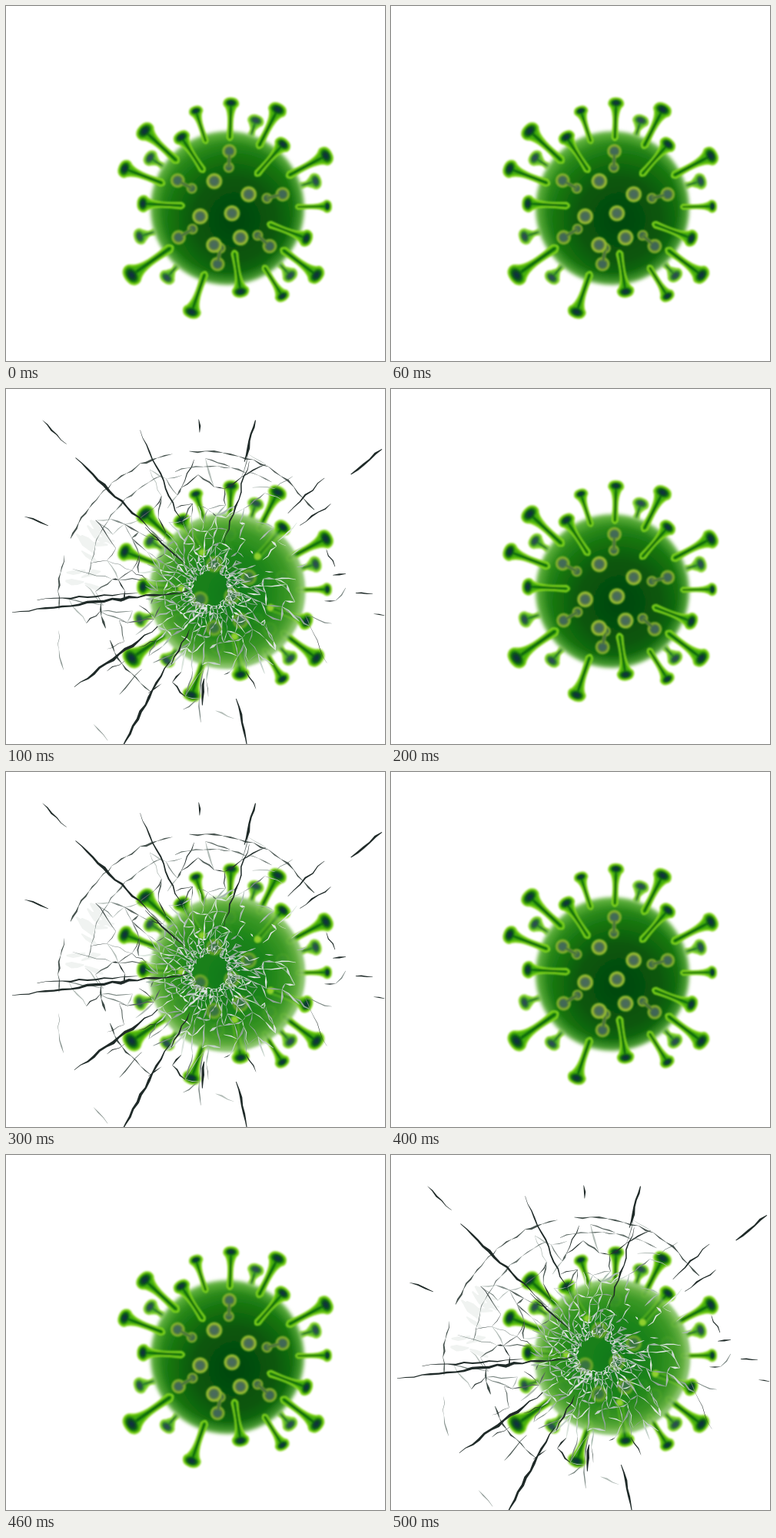
An HTML page for the animation above (600 ms loop, 493x462 px).

```html
<!DOCTYPE html>
<html lang="en">
<head>
<meta charset="utf-8">
<title>Virus behind breaking glass</title>
<style>
html, body { margin: 0; width: 100%; height: 100%; overflow: hidden; background: #fff; }
svg { display: block; width: 493px; height: 462px; }
</style>
</head>
<body>
<svg viewBox="0 0 493 462" xmlns="http://www.w3.org/2000/svg">
  <defs>
    <radialGradient id="skin" gradientUnits="userSpaceOnUse" cx="297" cy="278" r="119">
      <stop offset="0" stop-color="#04460a"/>
      <stop offset=".45" stop-color="#08570b"/>
      <stop offset=".72" stop-color="#187711"/>
      <stop offset="1" stop-color="#48a428"/>
    </radialGradient>
    <radialGradient id="edge">
      <stop offset=".84" stop-color="#7cc452" stop-opacity="0"/>
      <stop offset=".95" stop-color="#7cc452" stop-opacity=".45"/>
      <stop offset="1" stop-color="#b4de98" stop-opacity=".9"/>
    </radialGradient>
    <radialGradient id="lit">
      <stop offset="0" stop-color="#147f1a"/>
      <stop offset=".55" stop-color="#208a1a"/>
      <stop offset=".8" stop-color="#3f9c28"/>
      <stop offset=".93" stop-color="#6bb445"/>
      <stop offset="1" stop-color="#a9d68c"/>
    </radialGradient>
    <radialGradient id="head">
      <stop offset="0" stop-color="#12304a"/>
      <stop offset=".35" stop-color="#0c3a2c"/>
      <stop offset=".65" stop-color="#0e6412"/>
      <stop offset="1" stop-color="#2f9a10" stop-opacity="0"/>
    </radialGradient>
    <radialGradient id="dot">
      <stop offset="0" stop-color="#486764"/>
      <stop offset=".5" stop-color="#4b704c"/>
      <stop offset=".68" stop-color="#84a436"/>
      <stop offset=".85" stop-color="#a4c833"/>
      <stop offset="1" stop-color="#4f9714" stop-opacity=".3"/>
    </radialGradient>
    <filter id="soft" filterUnits="userSpaceOnUse" x="0" y="0" width="493" height="462"><feGaussianBlur stdDeviation=".8"/></filter>
    <filter id="rim" filterUnits="userSpaceOnUse" x="0" y="0" width="493" height="462"><feGaussianBlur stdDeviation="2"/></filter>
  </defs>
  <g id="back" filter="url(#soft)" opacity=".88"></g>
  <g filter="url(#rim)">
    <circle cx="288" cy="263" r="100" fill="url(#skin)"/>
    <circle cx="288" cy="263" r="101" fill="url(#edge)"/>
  </g>
  <g id="pairs" filter="url(#soft)" opacity=".85"></g>
  <g id="dots" filter="url(#soft)"></g>
  <g id="outer" filter="url(#soft)"></g>
  <g id="inner" filter="url(#soft)"></g>
  <g id="glass" visibility="hidden">
    <circle cx="288" cy="263" r="100" fill="url(#lit)" opacity=".9" filter="url(#rim)"/>
    <use href="#dots" opacity=".6"/>
    <use href="#inner" opacity=".3"/>
    <g id="roots" filter="url(#soft)"></g>
    <g id="cracks"></g>
  </g>
</svg>
<script>
const $ = id => document.getElementById(id);
const body = [288, 263], hub = [266, 259];

let seed = 7;
function rnd() {
  seed = seed + 0x6D2B79F5 | 0;
  let t = Math.imul(seed ^ seed >>> 15, 1 | seed);
  t = t + Math.imul(t ^ t >>> 7, 61 | t) ^ t;
  return ((t ^ t >>> 14) >>> 0) / 4294967296;
}
const span = (a, b) => a + (b - a) * rnd();
const pick = list => list[Math.floor(rnd() * list.length)];

function polar([x, y], deg, r) {
  const a = deg * Math.PI / 180;
  return [x + r * Math.cos(a), y + r * Math.sin(a)];
}

// Spikes point straight out of the body: angle, reach of the head
const outer = [
  [223, 147], [252, 133], [272, 137], [297, 144], [332, 145], [359, 130],
  [37, 145], [58, 135], [109, 143], [145, 152], [201, 143]
];
const inner = [183, 237, 311, 21, 81];
const hidden = [213, 288, 343, 47, 131, 162];
const pairs = [100, 149, 209, 272, 346, 42];
const singles = [[244, 39], [327, 33], [163, 37], [49, 9], [110, 51], [66, 42]];

function spike(deg, root, reach, r) {
  const L = reach - root, b = r * .35, m = r * .19;
  const neck = Math.max(0, L - 1.2 * r), tip = L + .62 * r, wing = L - .5 * r;
  const shape = `M0 ${-b}C${.4 * L} ${-m} ${neck} ${-m} ${wing} ${-.7 * r}` +
    `C${L - .2 * r} ${-1.1 * r} ${tip} ${-r} ${tip} 0` +
    `C${tip} ${r} ${L - .2 * r} ${1.1 * r} ${wing} ${.7 * r}` +
    `C${neck} ${m} ${.4 * L} ${m} 0 ${b}Q${-2 * b} 0 0 ${-b}Z`;
  const core = (w, c) => `<path d="M0 0H${wing}" stroke="${c}" stroke-width="${w}" stroke-linecap="round"/>`;
  return `<g transform="translate(${body}) rotate(${deg}) translate(${root})">
    <path d="${shape}" fill="#46b00e" stroke="#82d61c" stroke-width="2.2" stroke-linejoin="round"/>
    ${core(r * .36, '#1f8f0d')}${core(r * .18, '#07600a')}
    <ellipse cx="${L}" rx="${.6 * r}" ry="${.88 * r}" fill="url(#head)"/></g>`;
}

const disc = ([x, y], r, fill) => `<circle cx="${x}" cy="${y}" r="${r}" fill="${fill}"/>`;

function pair(deg) {
  const far = polar(body, deg, 74), near = polar(body, deg, 53);
  const link = (w, c) => `<path d="M${far}L${near}" stroke="${c}" stroke-width="${w}"/>`;
  return disc(far, 10, 'url(#dot)') + disc(near, 7.5, 'url(#dot)') +
    link(5, '#83a338') + link(2.6, '#4b7046') + disc(far, 4.5, '#486764');
}

$('back').innerHTML = hidden.map(a => spike(a, 100, 120, 10.5)).join('');
$('outer').innerHTML = outer.map(([a, reach]) => spike(a, 92, reach, reach * .3 - 31)).join('');
$('inner').innerHTML = inner.map(a => spike(a, 60, 110, 11)).join('');
$('pairs').innerHTML = pairs.map(pair).join('');
$('dots').innerHTML = singles.map(([a, r]) => disc(polar(body, a, r), 11, 'url(#dot)')).join('');
$('roots').innerHTML = inner.map(a => disc(polar(body, a, 60), 4.5, '#8fd02e')).join('');

// Cracks are jagged ribbons, gathered by colour
const ink = {};
function ribbon([x, y], [u, v], w, color) {
  const L = Math.hypot(u - x, v - y) || 1, n = Math.max(2, Math.ceil(L / 11));
  const nx = (y - v) / L, ny = (u - x) / L, wob = Math.min(1.7, L * .09);
  const left = [], right = [];
  for (let i = 0; i <= n; i++) {
    const k = i / n, off = i % n ? span(-wob, wob) : 0;
    const half = w / 2 * (.25 + .75 * Math.sin(Math.PI * k)) * span(.6, 1.3);
    const at = d => [x + (u - x) * k + nx * d, y + (v - y) * k + ny * d].map(c => c.toFixed(1)).join(' ');
    left.push(at(off + half));
    right.unshift(at(off - half));
  }
  ink[color] = (ink[color] || '') + 'M' + left.concat(right).join('L') + 'Z';
}

function arc(a0, a1, r0, r1, w, color) {
  const n = Math.ceil(Math.abs(a1 - a0) / 7);
  let last = polar(hub, a0, r0);
  for (let i = 1; i <= n; i++) {
    const k = i / n, next = polar(hub, a0 + (a1 - a0) * k, r0 + (r1 - r0) * k + span(-1.5, 1.5));
    if (rnd() < .88) ribbon(last, next, w * span(.6, 1.3), color);
    last = next;
  }
}

const pale = ['#dbe5de', '#c3d1c9', '#a8bab0', '#8fa498'];
const dark = ['#25302e', '#56625e', '#7d8985', '#b3bdb8'];

// Faint facets left of the body
for (let i = 0; i < 14; i++) {
  const a = span(178, 212), r = span(138, 165);
  ribbon(polar(hub, a, r), polar(hub, a + span(-4, 4), r + 24), 8, '#f0f3f1');
}

// How much of the web shows at an angle and radius
function density(deg, r) {
  const a = (deg + 360) % 360, clear = a > 284 && a < 350;
  if (r < 40) return .9;
  if (r < 100) return clear ? .22 : .72;
  if (a > 178 && a < 312) return .5;
  if (a > 95 && a <= 178) return r < 150 ? .28 : .04;
  return r < 125 ? .3 : .06;
}

// A jittered polar net around the impact
const SPOKES = 48, RINGS = 11;
const net = [];
for (let i = 0; i < SPOKES; i++) {
  net[i] = [];
  for (let j = 0; j < RINGS; j++) {
    const a = (i + span(-.45, .45)) * 360 / SPOKES, r = 23 * 1.22 ** j * span(.9, 1.1);
    net[i][j] = { a, r, p: polar(hub, a, r) };
  }
}
function strand(from, to, share) {
  if (!to || rnd() > density(from.a, from.r) * share) return;
  const inside = Math.hypot(from.p[0] - body[0], from.p[1] - body[1]) < 99;
  ribbon(from.p, to.p, inside ? span(1, 2.8) : span(.7, 2), pick(inside ? pale : dark));
}
net.forEach((spoke, i) => spoke.forEach((node, j) => {
  const beside = net[(i + 1) % SPOKES];
  strand(node, spoke[j + 1], 1);
  strand(node, beside[j], .75);
  strand(node, beside[j + 1], .45);
}));

// Rings around the impact
arc(172, 323, 199, 168, 2, '#46524e');
arc(186, 300, 160, 158, 1.6, '#66726e');
arc(172, 120, 144, 155, 2.2, '#3d4a46');
arc(171, 124, 201, 240, 1.4, '#8b9692');

// Long cracks run out from the impact: angle, start, end
const bold = [
  [173, 30, 260], [224, 110, 244], [285, 170, 226], [321, 235, 287],
  [119, 110, 238], [77, 148, 212], [94, 118, 153], [144, 85, 219]
];
const fine = [
  [176, 95, 226], [223, 45, 116], [225, 265, 309], [287, 60, 172], [266, 203, 220], [246, 90, 225],
  [316, 140, 206], [325, 142, 191], [201, 226, 259], [117, 60, 112], [354, 160, 177], [2, 189, 211], [9, 215, 229]
];
const radial = (list, w) => list.forEach(([a, r0, r1]) => ribbon(polar(hub, a, r0), polar(hub, a, r1), w, '#1f2a28'));
radial(bold, 3.6);
radial(fine, 1.9);

$('cracks').innerHTML = Object.entries(ink).map(([c, d]) => `<path d="${d}" fill="${c}"/>`).join('');

const STEP = 100, start = performance.now();
function draw(t) {
  const broken = Math.floor(t / STEP) % 2 === 1;
  $('glass').setAttribute('visibility', broken ? 'visible' : 'hidden');
}
function tick() {
  draw(performance.now() - start);
  requestAnimationFrame(tick);
}
tick();
</script>
</body>
</html>
```
